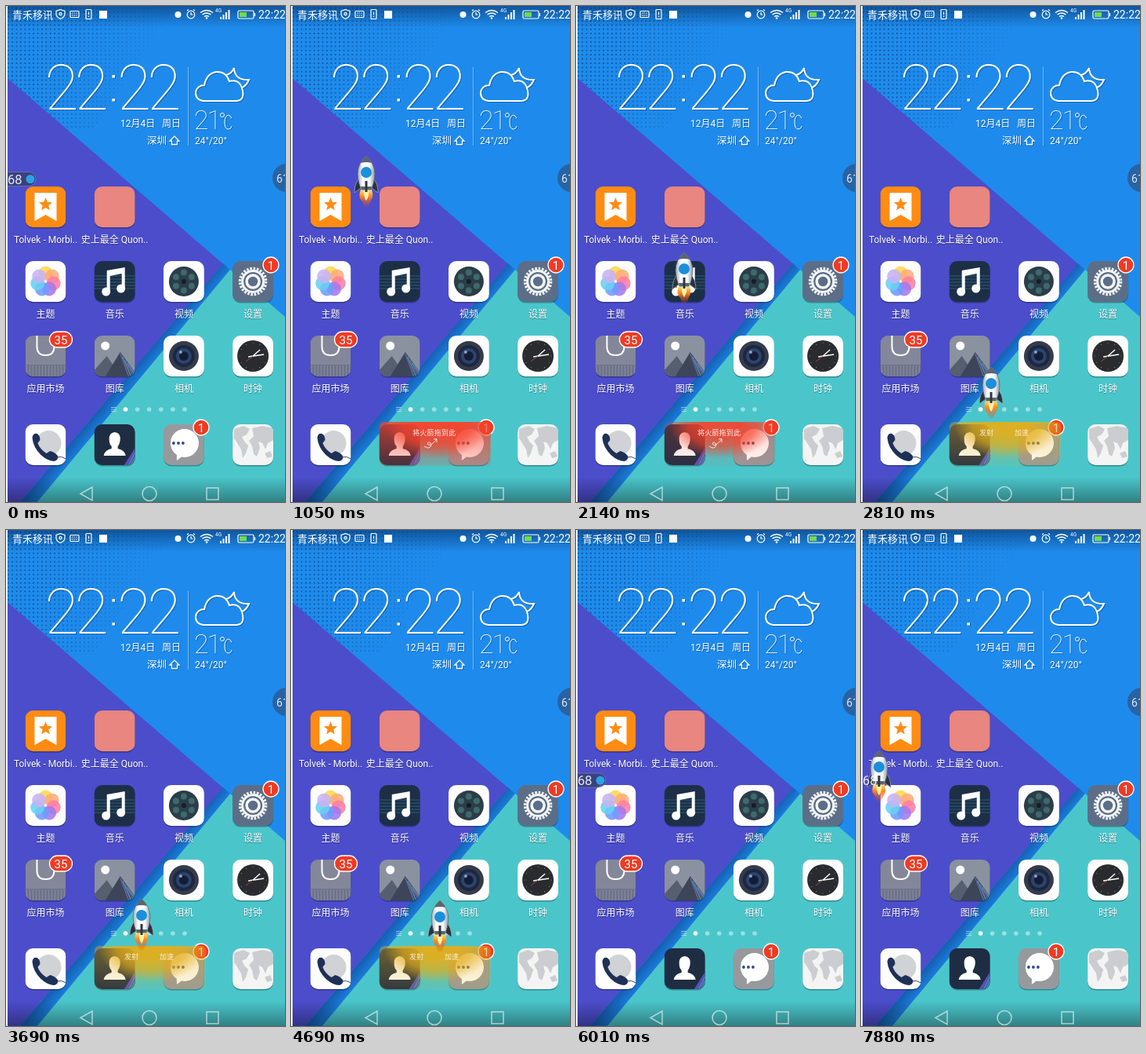
Animation of 356 by 632 pixels, one loop 8 s. Source, as an HTML page:

```html
<!DOCTYPE html>
<html lang="zh-CN">
<head>
<meta charset="utf-8">
<title>Rocket launcher</title>
<style>
html, body { margin: 0; width: 100%; height: 100%; overflow: hidden; background: #1e8bec; }
svg { display: block; width: 356px; height: 632px; }
text { font-family: Roboto, "Noto Sans CJK SC", "Noto Sans CJK", sans-serif; fill: #fff; }
.thin { font-weight: 100; }
.label { font-size: 12px; text-anchor: middle; text-shadow: 0 1px 1px #0006; }
.badge { font-size: 15px; text-anchor: middle; }
.line { fill: none; stroke: #fff; }
.padStop { stop-color: var(--pad); }
#clock { filter: drop-shadow(1px 1px .6px #0a3f8688); }
</style>
</head>
<body>
<svg viewBox="0 0 356 632">
  <defs>
    <pattern id="dots" width="5.4" height="5.4" patternUnits="userSpaceOnUse"><circle cx="2.7" cy="2.7" r=".9" fill="#0c437f"/></pattern>
    <linearGradient id="fade" gradientUnits="userSpaceOnUse" x1="0" y1="30" x2="185" y2="100">
      <stop offset=".3" stop-color="#fff"/><stop offset="1" stop-color="#000"/>
    </linearGradient>
    <mask id="dotMask"><path d="M2 0H215L112 158H78L2 92Z" fill="url(#fade)"/></mask>
    <linearGradient id="top" x2="0" y2="1"><stop stop-color="#062a5c" stop-opacity=".55"/><stop offset="1" stop-color="#062a5c" stop-opacity="0"/></linearGradient>
    <linearGradient id="bottom" x2="0" y2="1"><stop stop-opacity="0"/><stop offset="1" stop-opacity=".35"/></linearGradient>
    <linearGradient id="strip" gradientUnits="userSpaceOnUse" x1="148" y1="480" x2="166" y2="495">
      <stop stop-color="#1560b0"/><stop offset=".5" stop-color="#1a76d4"/><stop offset="1" stop-color="#1f88e8"/>
    </linearGradient>
    <linearGradient id="hull"><stop stop-color="#9aa8b6"/><stop offset=".3" stop-color="#fff"/><stop offset=".7" stop-color="#f4f7fa"/><stop offset="1" stop-color="#8896a5"/></linearGradient>
    <linearGradient id="fire" x2="0" y2="1"><stop stop-color="#ffe27a"/><stop offset=".35" stop-color="#ff8a1c"/><stop offset="1" stop-color="#e03a10" stop-opacity="0"/></linearGradient>
    <linearGradient id="jet" x2="0" y2="1"><stop stop-color="#fff" stop-opacity=".55"/><stop offset=".4" stop-color="#fff" stop-opacity=".9"/><stop offset="1" stop-color="#fff"/></linearGradient>
    <radialGradient id="core" gradientUnits="userSpaceOnUse" cx="0" cy="0" r="1" gradientTransform="translate(186 533) scale(68 44)">
      <stop class="padStop" offset=".3" stop-opacity=".9"/><stop class="padStop" offset=".65" stop-opacity=".65"/><stop class="padStop" offset="1" stop-opacity="0"/>
    </radialGradient>
    <linearGradient id="glow" x2="0" y2="1"><stop class="padStop" stop-opacity=".8"/><stop class="padStop" offset="1" stop-opacity=".2"/></linearGradient>
    <filter id="soft" x="-10%" y="-20%" width="120%" height="140%"><feGaussianBlur stdDeviation="1.2"/></filter>
    <clipPath id="tile"><rect width="52" height="52" rx="10"/></clipPath>
  </defs>

  <rect width="356" height="632" fill="#1e8bec"/>
  <rect width="356" height="632" fill="url(#dots)" mask="url(#dotMask)"/>
  <path d="M277 328L286 336L40 632H18Z" fill="url(#strip)"/>
  <path d="M2 92L277 328.500L18 632H2Z" fill="#4c4dcb"/>
  <path d="M286 336L356 396V632H40Z" fill="#4ac6cb"/>
  <rect width="356" height="28" fill="url(#top)"/>
  <rect y="600" width="356" height="32" fill="url(#bottom)"/>

  <g id="status" font-size="13">
    <text x="8" y="16" font-weight="500">青禾移讯</text>
    <g class="line" stroke-width="1.2">
      <path d="M69.500 4.500L75 6.500V10Q75 14 69.500 16.500Q64 14 64 10V6.500Z"/>
      <circle cx="69.500" cy="10" r="1.600"/>
      <rect x="82" y="6.500" width="11" height="8" rx="1"/><path d="M84 9H91M84 12H91" stroke-dasharray="1.500 1"/>
      <rect x="102" y="4.500" width="7" height="12" rx="1"/><path d="M105.500 7.500V11M105.500 12.500V14"/>
      <circle cx="236" cy="11" r="4.800"/><path d="M236 8V11H238.500M231 6L233 4.500M241 6L239 4.500"/>
      <path d="M248 8.500Q256 2.500 264 8.500M250.500 11Q256 7 261.500 11M253 13.500Q256 11.500 259 13.500" stroke-width="1.500"/>
      <path d="M274 17V14M277.500 17V11M281 17V8M284.500 17V5" stroke-width="2"/>
      <rect x="296" y="6" width="20" height="10" rx="1.500"/><path d="M317.500 9V13"/>
    </g>
    <rect x="119" y="6" width="10" height="10" fill="#fff"/>
    <circle cx="219.500" cy="11" r="4" fill="#fff"/>
    <rect x="298" y="8" width="9" height="6" fill="#6fdc4a"/>
    <text x="267" y="8" font-size="6.500">4G</text>
    <circle cx="256" cy="15.500" r="1.300" fill="#fff"/>
    <text x="322" y="16" font-size="14">22:22</text>
  </g>

  <g id="clock">
    <g class="thin" font-size="79" letter-spacing="-5">
      <text x="49.500" y="132">22</text><text x="142" y="132">22</text>
    </g>
    <path d="M135.500 88h3.500v3.500h-3.500zM135.500 118h3.500v3.500h-3.500z" fill="#fff"/>
    <text x="146" y="154" font-size="12">12月4日</text><text x="199" y="154" font-size="12">周日</text>
    <text x="180" y="176" font-size="12.500" font-weight="500">深圳</text>
    <path class="line" stroke-width="1.300" d="M209 172L215 166L221 172H218.500V176.500H211.500V172Z"/>
    <path d="M232.500 78V178" stroke="#fff" stroke-opacity=".4"/>
    <path class="line" stroke-width="2" d="M252 121Q242 120 242 110Q244 101 253 101Q256 86 268 84Q281 83 285 96Q297 93 301 104Q306 120 294 121ZM281 88Q288 86 291 79Q292 95 310 94Q306 103 300 104"/>
    <text class="thin" x="240" y="157" font-size="34" letter-spacing="-2">21</text>
    <circle class="line" cx="276" cy="139" r="2.500"/><path class="line" d="M288 143Q286 139 283.500 139Q279 140 279 148Q279 157 284 157Q287 157 288 153"/>
    <text x="241" y="176" font-size="12">24°/20°</text>
  </g>

  <g id="icons"></g>
  <g id="pages" fill="#fff"><path d="M134 511.500H141M134 514H141M134 516.500H141" stroke="#fff" stroke-opacity=".5"/></g>
  <g class="line" stroke-opacity=".6" stroke-width="1.500">
    <path d="M110 613V630L95 621.500Z"/><circle cx="183" cy="621.500" r="9"/><rect x="256" y="614" width="15" height="15"/>
  </g>
  <circle cx="358" cy="219" r="18" fill="#2b568c" fill-opacity=".75"/>
  <text x="345" y="225" font-size="14" fill-opacity=".85">61</text>

  <g id="pad">
    <rect id="halo" x="113" y="530" width="142" height="56" rx="6" fill="url(#glow)"/>
    <rect x="113" y="530" width="142" height="56" fill="url(#core)"/>
    <g id="hint"><text x="155" y="547" font-size="9.200" fill-opacity=".9">将火箭拖到此</text>
      <path class="line" stroke-opacity=".8" d="M170 561Q177 566 179 559Q176 553 174 558Q177 563 186 552M182 552L186 551.500L186 556"/></g>
    <g id="ready" font-size="9" fill-opacity=".8"><text x="151" y="547">发射</text><text x="196" y="547">加速</text></g>
  </g>
  <g id="smoke"><path id="column" fill="url(#jet)" filter="url(#soft)"/><g id="puffs" fill="#fff" filter="url(#soft)"></g></g>

  <g id="rocket">
    <path d="M-7 43Q-11 53 -5 58Q-3 66 1 67Q5 61 6 57Q10 52 7 43Z" fill="url(#fire)"/>
    <path d="M-3 43Q-4 51 0 57Q4 51 3 43Z" fill="#fff3b0"/>
    <path d="M-8 28Q-15 34 -15 47L-7 41ZM8 28Q15 34 15 47L7 41Z" fill="#2c333d" stroke="#a4adb7" stroke-width=".7"/>
    <path d="M0 0Q11 10 11 23Q10 36 6 43H-6Q-10 36 -11 23Q-11 10 0 0Z" fill="url(#hull)" stroke="#56636f" stroke-width=".7"/>
    <path d="M0 0Q5 4.500 7 9Q0 7 -7 9Q-5 4.500 0 0Z" fill="#5b6570"/>
    <path d="M-7 39H7L6 43H-6Z" fill="#5a646f"/>
    <path d="M-1.500 32H1.500V46H-1.500Z" fill="#30363e"/>
    <circle cy="21" r="7" fill="#1c8fdb"/>
  </g>

  <g id="pill">
    <path id="pillBack" d="M0 -9H29A9 9 0 0 1 29 9H0Z" fill="#333c62" fill-opacity=".7" stroke="#8a94b8" stroke-opacity=".5"/>
    <text x="2" y="6" font-size="16.500" fill-opacity=".88">68</text>
    <circle id="pillDot" cx="31" r="5.500" fill="#2aa3e6"/>
  </g>
  <g id="ball"><circle cx="155" cy="312" r="19" fill="#2b4078" fill-opacity=".75"/><text x="155" y="318" font-size="16" text-anchor="middle">68</text></g>
  <rect width="2" height="632" fill="#f4f7fa"/>
</svg>
<script>
const $ = id => document.getElementById(id);
const range = (n, f) => Array.from({ length: n }, (_, i) => f(i)).join('');
const circle = (x, y, r, fill, more = '') => `<circle cx="${x}" cy="${y}" r="${r}" fill="${fill}" ${more}/>`;
const path = (d, fill, more = '') => `<path d="${d}" fill="${fill}" ${more}/>`;
const stroke = (d, color, w = 1, more = '') => path(d, 'none', `stroke="${color}" stroke-width="${w}" ${more}`);
const polar = (i, n, r) => [26 + r * Math.sin(i / n * 2 * Math.PI), 26 - r * Math.cos(i / n * 2 * Math.PI)];

const petals = ['#ffd84a', '#ffab78', '#ff7fa6', '#a679ee', '#6f9bff', '#66d2f2', '#c9b2f5'];
const star = range(10, i => (i ? 'L' : 'M') + polar(i, 10, i % 2 ? 4 : 9)) + 'Z';
const art = {
  bookmark: path('M12 8H40V44L26 36L12 44Z', '#fff') + path(star, '#ff8c12', 'transform="translate(0 -3)"'),
  plain: '',
  flower: range(7, i => circle(...polar(i, 7, 10.5), 9, petals[i], 'fill-opacity=".88"')),
  music: range(5, i => stroke(`M0 ${19 + i * 4}H52`, '#2f7f92', 1, 'stroke-opacity=".6"')) +
    path('M16 12L39 8V36H35V16L20 19V40H16Z', '#fff') + circle(15, 39, 5.5, '#fff') + circle(34, 35, 5.5, '#fff'),
  reel: circle(26, 26, 19, '#2b3d48') + range(6, i => circle(...polar(i, 6, 11.5), 4, '#3d6a6c')) + circle(26, 26, 3, '#10202a'),
  gear: circle(26, 26, 16.5, 'none', 'stroke="#f4f6f8" stroke-width="3.500" stroke-dasharray="2.600 1.720"') +
    circle(26, 26, 13.5, 'none', 'stroke="#f4f6f8" stroke-width="3"') + circle(26, 26, 8, 'none', 'stroke="#f4f6f8" stroke-width="3.500"'),
  market: path('M0 37H52V52H0Z', '#6f748b') + range(13, i => stroke(`M${2 + i * 4} 38V52`, '#858b9e')) +
    stroke('M15 0V14Q15 25 26 25Q37 25 37 14V0', '#fff', 2),
  gallery: circle(14, 13, 5.5, '#fff') + path('M0 44L16 26L34 52H0Z', '#565f70') + path('M14 52L33 21L52 47V52Z', '#3c4658') +
    range(5, i => stroke(`M${33 + i * 3} ${23 + i * 4}L${44 + i * 3} 52`, i % 2 ? '#45a5a6' : '#7662b4', 1.2)),
  lens: circle(26, 26, 19, '#343b4b') + circle(26, 26, 14, '#1d2740') + circle(26, 26, 10, '#2c456f') + circle(26, 26, 6, '#141d34') + circle(22, 21, 2, '#8aa2cf'),
  clock: circle(26, 26, 20, '#2a2b2e') + range(12, i => circle(...polar(i, 12, 17), .6, '#888')) +
    stroke('M20 27L40 24', '#fff', 1.6) + stroke('M26 26L35 18', '#fff', 1.4) + stroke('M26 26L17 33', '#a55', .8),
  phone: circle(30, 24, 16, '#d0d2d5') +
    path('M9 17Q10 11 15 12Q19 14 19 20L16 24Q19 32 27 37L32 34Q39 36 42 41Q42 46 37 47Q29 47 20 39Q10 29 9 17Z', '#1f3057') +
    stroke('M41 42Q46 40 52 44', '#3b4b70', 1),
  person: path('M52 30L38 52H52Z', '#5b4fb5') + range(3, i => stroke(`M52 ${36 + i * 5}L${44 + i * 3} 52`, '#36a7a8')) +
    path('M26 10Q34 11 33 20Q32 26 30 28V31Q39 33 40 40H12Q13 33 22 31V28Q19 25 19 20Q18 11 26 10Z', '#fff'),
  chat: path('M26 6A18 18 0 1 1 23 41.500L17 46V39A18 18 0 0 1 26 6Z', '#fff') + range(3, i => circle(13 + i * 6, 24, 1.9, '#34498c')),
  world: path('M2 6L14 2L22 6L18 13L12 16L15 22L20 27L17 37L13 43L11 32L6 24L2 18Z', '#cbcdd0') +
    path('M25 5L38 2L52 5V20L45 24L42 32L38 24L33 22L35 30L31 41L27 38L25 28L21 21L27 15Z', '#cbcdd0') + path('M41 37L48 34L51 41L44 43Z', '#cbcdd0')
};
const apps = [
  [0, 230, '#ff8c12', 'bookmark', 'Tolvek - Morbi..'], [1, 230, '#e8867f', 'plain', '史上最全 Quon..'],
  [0, 325, '#fdfdfd', 'flower', '主题'], [1, 325, '#1d2f47', 'music', '音乐'], [2, 325, '#fdfdfd', 'reel', '视频'], [3, 325, '#5c6e87', 'gear', '设置'],
  [0, 420, '#838799', 'market', '应用市场'], [1, 420, '#8a929f', 'gallery', '图库'], [2, 420, '#fdfdfd', 'lens', '相机'], [3, 420, '#fdfdfd', 'clock', '时钟'],
  [0, 533, '#fdfdfd', 'phone'], [1, 533, '#1f2d43', 'person'], [2, 533, '#98999c', 'chat'], [3, 533, '#f4f4f4', 'world']
];
const badge = (x, y, w, n) => `<rect x="${x - w / 2}" y="${y - 10}" width="${w}" height="20" rx="10" fill="#ef3b24" stroke="#fff" stroke-width="1.300"/>
  <text class="badge" x="${x}" y="${y + 5.5}">${n}</text>`;
$('icons').innerHTML = apps.map(([col, y, fill, name, label = '']) => {
  const x = 24.5 + col * 88.2;
  return `<g transform="translate(${x} ${y})"><rect y="1.500" width="52" height="52" rx="10" fill="#000" fill-opacity=".3"/>
    <g clip-path="url(#tile)"><rect width="52" height="52" fill="${fill}"/>${art[name]}</g></g>
    <text class="label" x="${x + 26}" y="${y + 72}">${label}</text>`;
}).join('') + badge(338, 330, 20, 1) + badge(70, 425, 29, 35) + badge(249, 537, 20, 1);
$('pages').innerHTML += range(6, i => circle(152.5 + i * 15.1, 514, 2.8, '#fff', `fill-opacity="${i ? .45 : 1}"`));

let seed = 7;
const rand = () => (seed = seed * 16807 % 2147483647) / 2147483647;
$('puffs').innerHTML = range(90, () => {
  const u = rand() * 2 - 1, lift = 1 - Math.abs(u) ** 3;
  return circle(183 + u * 102, 592 - rand() * 22 * lift, 4 + rand() * 7, '#fff', `fill-opacity="${.5 + rand() * .45}"`);
});

const ticks = [0, 500, 620, 770, 920, 1050, 1200, 1330, 1450, 1570, 1720, 1840, 1990, 2140, 2290, 2420, 2560, 2690, 2810, 2960,
  3120, 3240, 3390, 3540, 3690, 3840, 3970, 4120, 4270, 4420, 4570, 4690, 4820, 4970, 5100, 5240, 5360, 5480, 5600, 5740, 5860, 6010, 7880];
// time, centre x, nose y
const flight = [[500, 30, 183], [620, 43, 166], [920, 80, 170], [1050, 96, 191], [1570, 112, 205], [1840, 127, 245], [1990, 131, 287],
  [2140, 138, 314], [2810, 166, 460], [2960, 169, 461], [3240, 160, 450], [3540, 182, 465], [3690, 173, 470], [3970, 173, 470],
  [4120, 184, 469], [4270, 168, 462], [4420, 192, 464], [4690, 190, 472], [4820, 183, 471], [5100, 183, 438], [5600, 183, 23], [7880, 23, 281]];

function place(t) {
  const i = Math.max(1, flight.findIndex(k => k[0] >= t));
  const [t0, x0, y0] = flight[i - 1], [t1, x1, y1] = flight[i];
  const p = (t - t0) / (t1 - t0);
  return [x0 + (x1 - x0) * p, y0 + (y1 - y0) * p];
}
const show = (id, on) => $(id).style.display = on ? '' : 'none';

function draw(now) {
  const time = now % 8000;
  const t = ticks.filter(k => k <= time).pop();
  const flying = t >= 500 && t < 5740, held = t === 7880;
  show('rocket', flying || held);
  const [x, y] = flying || held ? place(t) : [0, 0];
  $('rocket').setAttribute('transform', `translate(${x} ${y})`);

  const armed = t >= 2690;
  show('pad', t >= 500 && t < 4820);
  document.documentElement.style.setProperty('--pad', armed ? '#e4ae1a' : '#f5432c');
  $('halo').style.opacity = armed ? .5 : .6 + .3 * Math.cos((t - 1050) / 727 * 2 * Math.PI);
  show('hint', !armed);
  show('ready', armed);

  show('smoke', t >= 4820 && t < 5860);
  $('smoke').style.opacity = t >= 5740 ? .5 : 1;
  const grow = Math.min(1, .75 + (t - 4820) / 1120);
  $('puffs').setAttribute('transform', `translate(183 598) scale(${grow}) translate(-183 -598)`);
  const head = Math.max(445, flying ? y + 62 : 445);
  $('column').setAttribute('d', `M179 ${head}H185L190 540Q192 575 204 594H164Q175 575 176 540Z`);

  show('pill', t < 500 || t >= 6010);
  $('pill').setAttribute('transform', `translate(0 ${t < 500 ? 220.5 : 319})`);
  show('pillBack', !held);
  show('pillDot', !held);
  show('ball', t >= 5740 && t < 6010);
}
function frame() {
  draw(performance.now());
  requestAnimationFrame(frame);
}
draw(0);
frame();
</script>
</body>
</html>
```
